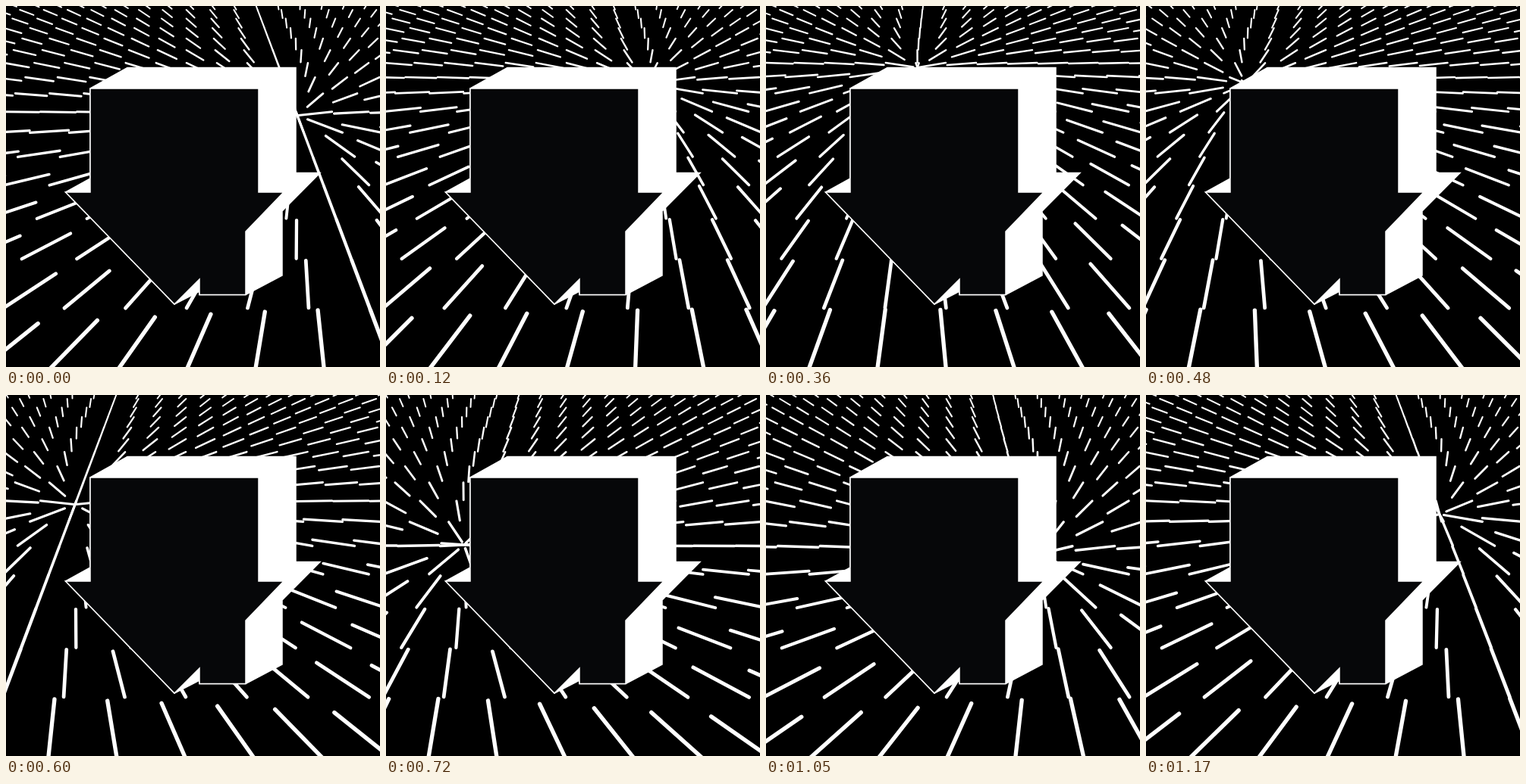
Animation of 493 by 477 pixels, one loop 1.2 s. Source, as an HTML page with a canvas:

```html
<!DOCTYPE html>
<html>
<head>
<meta charset="utf-8">
<style>
html, body { margin: 0; width: 493px; height: 477px; overflow: hidden; background: #000; }
canvas { display: block; }
</style>
</head>
<body>
<canvas id="stage" width="493" height="477"></canvas>
<script>
const ctx = document.getElementById('stage').getContext('2d');
const LOOP = 1200, STEP = 30;

// Floor in perspective: u counts columns, v is depth in rows.
const CENTER_X = 237.5, HORIZON = -246, DEPTH = 5743, COLUMN = 0.125, NEAR = 8.89;
const ORBIT = { v: 14.7, radius: 3 };

const scaleAt = v => DEPTH / v;
const project = (u, v) => [CENTER_X + u * COLUMN * scaleAt(v), HORIZON + scaleAt(v)];

const silhouette = [[111, 109], [160, 81.5], [382, 81.5], [382, 220.5], [414, 220.5], [364, 271], [364, 356],
  [316, 381.5], [255, 381.5], [255, 377], [222, 394], [78.5, 246], [111, 228]];
const front = [[111, 109], [333, 109], [333, 246], [366, 246], [316, 298], [316, 381.5],
  [255, 381.5], [255, 361], [222, 394], [78.5, 246], [111, 246]];

function polygon(points, fill) {
  ctx.beginPath();
  points.forEach(p => ctx.lineTo(...p));
  ctx.closePath();
  ctx.fillStyle = fill;
  ctx.fill();
  ctx.lineWidth = 1.5;
  ctx.stroke();
}

// A unit-long stick lying on the floor, turned toward the magnet.
function stick(u, v, magnet) {
  const angle = Math.atan2(magnet.v - v, magnet.u - u);
  const at = t => project(u + t * Math.cos(angle), v + t * Math.sin(angle));
  ctx.lineWidth = 0.0078 * scaleAt(v + 0.5 * Math.sin(angle));
  ctx.beginPath();
  ctx.moveTo(...at(0.015));
  ctx.lineTo(...at(0.985));
  ctx.stroke();
}

function draw(time) {
  const phase = 2 * Math.PI * time / LOOP;
  const magnet = {
    u: ORBIT.radius * Math.cos(phase),
    v: ORBIT.v + ORBIT.radius * Math.sin(phase)
  };
  ctx.fillStyle = '#000';
  ctx.fillRect(0, 0, 493, 477);
  ctx.strokeStyle = '#fff';
  ctx.lineCap = 'round';
  for (let row = -1; row <= 16; row++)
    for (let u = -10; u <= 10; u++) stick(u, NEAR + row, magnet);
  polygon(silhouette, '#fff');
  polygon(front, '#060709');
}

const start = performance.now();
function tick() {
  const time = (performance.now() - start) % LOOP;
  draw(Math.floor(time / STEP) * STEP);
  requestAnimationFrame(tick);
}
tick();
</script>
</body>
</html>
```
